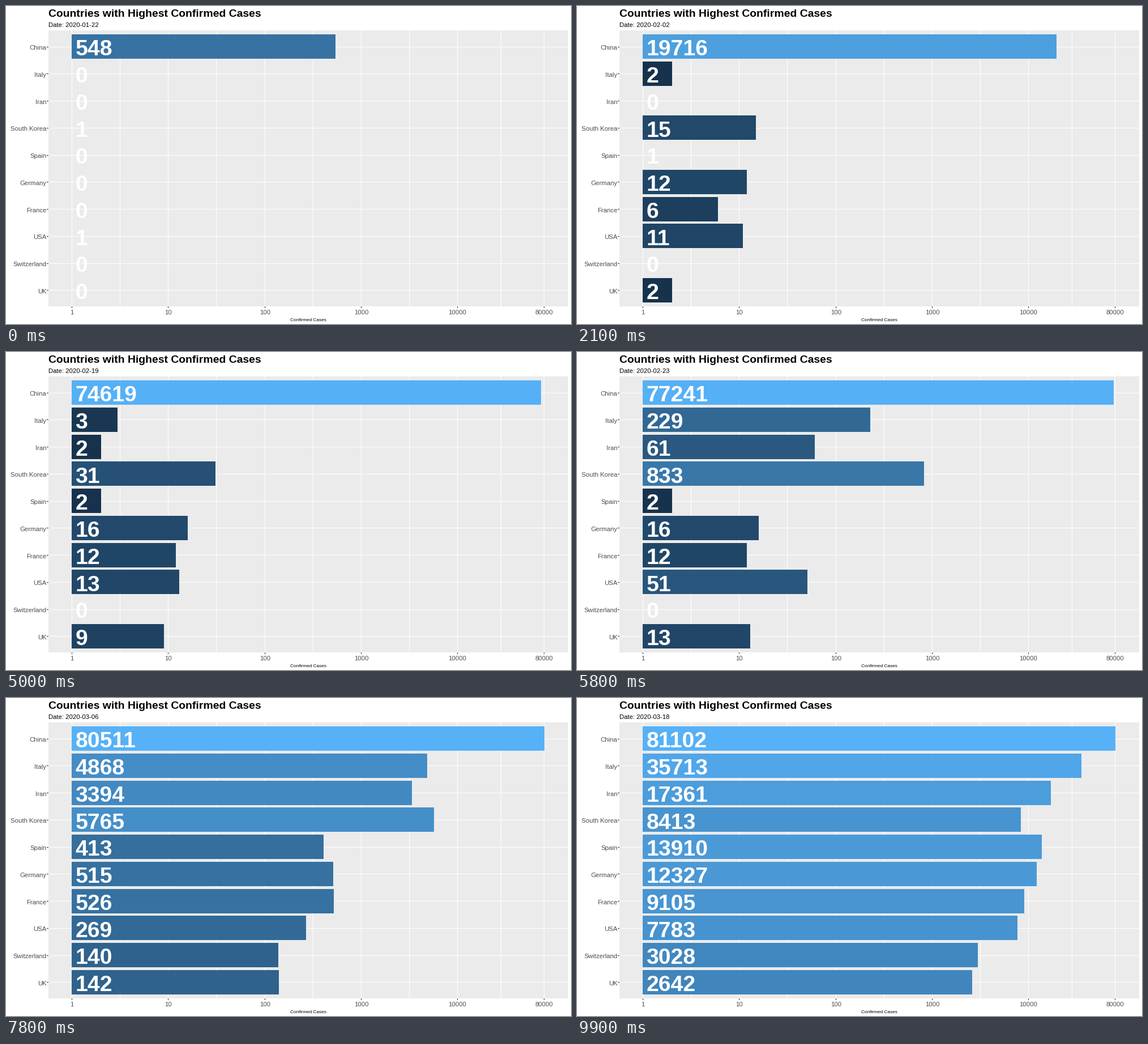
Animation, 998 px wide and 561 px high, one loop 10000 ms. Source, as a matplotlib script:

```python
import numpy as np
import matplotlib.pyplot as plt
from matplotlib.animation import FuncAnimation
from matplotlib.patches import Rectangle

W, H, DPI = 998, 561, 64
FRAMES, INTERVAL = 100, 100
LAST_DAY = 56
LEFT, RIGHT, TOP, BOTTOM = 75, 993, 43, 530
X_ONE, DECADE = 116.3, 170.1         # pixel of 1, pixels per power of ten
ROW_TOP, ROW_STEP, BAR_H = 71.6, 47.76, 43
FILL_MAX = np.log10(81102)

KEY_DAYS = [0, 6, 12, 22, 28, 33, 39, 47, 49, 56]
DAYS = np.array([d for d in range(LAST_DAY + 1) if d != 48])  # one day has no report
TIMES = np.round(DAYS * (FRAMES - 1) / LAST_DAY)

plt.rcParams["font.family"] = "Liberation Sans"
fig = plt.figure(figsize=(W / DPI, H / DPI), dpi=DPI, facecolor="white")
ax = fig.add_axes([0, 0, 1, 1])
ax.set_xlim(0, W)
ax.set_ylim(H, 0)
ax.axis("off")


def text(x, y, s, px, color="black", **kw):
    return ax.text(x, y, s, fontsize=px * 72 / DPI, color=color,
                   va="baseline", **kw)


def block(x, y, w, h, color, z=1):
    return ax.add_patch(Rectangle((x, y), w, h, fc=color, lw=0,
                                  antialiased=False, zorder=z))


def x_of(log_value):
    return int(np.floor(X_ONE + DECADE * log_value + 0.5))


# Colour ramp, blended in CIE Lab
TO_XYZ = np.array([[0.4124, 0.3576, 0.1805],
                   [0.2126, 0.7152, 0.0722],
                   [0.0193, 0.1192, 0.9505]])
WHITE = TO_XYZ.sum(axis=1)
TO_LAB = np.array([[0, 116, 0], [500, -500, 0], [0, 200, -200]])


def to_lab(rgb):
    c = np.array(rgb) / 255
    lin = np.where(c > 0.04045, ((c + 0.055) / 1.055) ** 2.4, c / 12.92)
    return TO_LAB @ np.cbrt(TO_XYZ @ lin / WHITE)


def to_rgb(lab):
    xyz = np.linalg.solve(TO_LAB, lab) ** 3 * WHITE
    lin = np.clip(np.linalg.solve(TO_XYZ, xyz), 0, 1)
    return np.where(lin > 0.0031308, 1.055 * lin ** (1 / 2.4) - 0.055,
                    lin * 12.92)


DARK, LIGHT = to_lab((19, 43, 67)), to_lab((86, 177, 247))


def fill(log_value):
    t = np.clip(log_value / FILL_MAX, 0, 1)
    return to_rgb(DARK + (LIGHT - DARK) * t)


# Panel, grid and axes
block(LEFT, TOP, RIGHT - LEFT, BOTTOM - TOP, "#EBEBEB")
breaks = [1, 10, 100, 1000, 10000, 80000]
logs = np.log10(breaks)
for lv in [*logs, *(logs[1:] + logs[:-1]) / 2]:
    block(x_of(lv), TOP, 1, BOTTOM - TOP, "white", 2)
for value, lv in zip(breaks, logs):
    block(x_of(lv), BOTTOM, 1, 3, "#333333")
    text(x_of(lv) + 0.5, 544, str(value), 11.3, "#4D4D4D", ha="center")

text(75, 19, "Countries with Highest Confirmed Cases", 19.4, weight="bold")
date = text(75, 37, "", 11.3)
text(533.7, 556, "Confirmed Cases", 8.25, ha="center")


class Row:
    """A bar that is empty until its start day, then grows geometrically."""
    count = 0

    def __init__(self, name, start, *cases):
        y = ROW_TOP + ROW_STEP * Row.count
        Row.count += 1
        days = [start] + [d for d in KEY_DAYS if d > start]
        growth = np.interp(DAYS, days, np.log10(cases))
        self.cases = np.where(DAYS < start, 0, np.round(10 ** growth))
        self.logs = np.log10(np.where(self.cases > 0, self.cases, np.nan))

        block(LEFT, round(y), RIGHT - LEFT, 1, "white", 2)
        block(LEFT - 3, round(y), 3, 1, "#333333")
        text(71.5, y + 5.4, name, 11.35, "#4D4D4D", ha="right")
        self.bar = block(x_of(0), round(y - BAR_H / 2), 0, BAR_H, "white", 3)
        self.label = text(122.3, y + 15.7, "", 39.1, "white",
                          weight="bold", zorder=4)

    def update(self, i):
        # the label moves linearly, the bar on the log scale
        self.label.set_text(f"{np.interp(i, TIMES, self.cases):.10g}")
        lv = np.interp(i, TIMES, self.logs)
        shown = bool(lv > 0)
        self.bar.set_visible(shown)
        if shown:
            self.bar.set_width(x_of(lv) - x_of(0))
            self.bar.set_facecolor(fill(lv))


rows = [
    Row("China", 0, 548, 5509, 19716, 59895, 74619, 77241, 79932, 80860,
        80921, 81102),
    Row("Italy", 9, 2, 2, 3, 3, 229, 1694, 9172, 12462, 35713),
    Row("Iran", 28, 2, 61, 978, 7161, 9000, 17361),
    Row("South Korea", 0, 1, 4, 15, 28, 31, 833, 3736, 7478, 7755, 8413),
    Row("Spain", 10, 1, 1, 2, 2, 2, 84, 1073, 2277, 13910),
    Row("Germany", 5, 1, 4, 12, 16, 16, 16, 130, 1176, 1908, 12327),
    Row("France", 2, 2, 4, 6, 11, 12, 12, 130, 1217, 2290, 9105),
    Row("USA", 0, 1, 5, 11, 13, 13, 51, 74, 583, 1281, 7783),
    Row("Switzerland", 34, 1, 27, 374, 652, 3028),
    Row("UK", 9, 2, 2, 9, 9, 13, 36, 322, 459, 2642),
]


def update(i):
    day = i * LAST_DAY // (FRAMES - 1)
    date.set_text(f"Date: {np.datetime64('2020-01-22') + day}")
    for row in rows:
        row.update(i)
    return []


anim = FuncAnimation(fig, update, frames=FRAMES, interval=INTERVAL,
                     repeat=True, repeat_delay=0)
plt.show()
```
